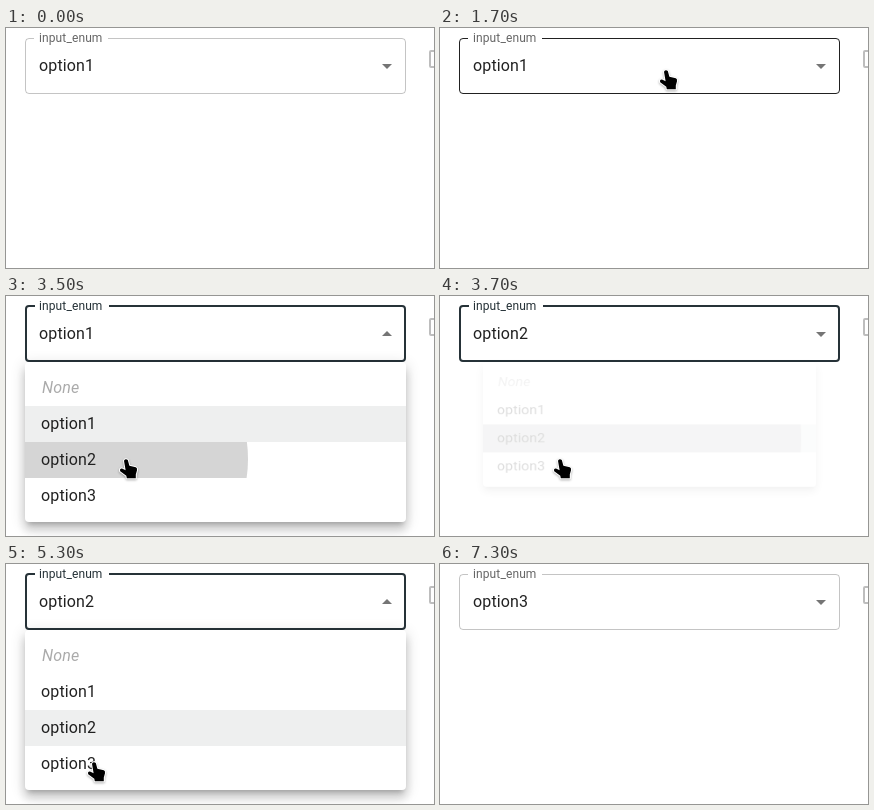
Write an HTML page that moves like this. It is 428 px wide and 240 px high and loops after 7.4 s.

```html
<!DOCTYPE html>
<html lang="en">
<head>
<meta charset="utf-8">
<title>Select field</title>
<style>
* { box-sizing: border-box; }
html, body { margin: 0; width: 100%; height: 100%; overflow: hidden; background: #fff; }
body {
  position: relative;
  font: 16px/23px Roboto, Arial, sans-serif;
  letter-spacing: .15px;
  color: rgba(0, 0, 0, .87);
}
#field { position: absolute; left: 19px; top: 9.5px; width: 381px; height: 56px; }
#value { position: absolute; left: 14px; top: 16.5px; }
#label {
  position: absolute; left: 0; top: 0; white-space: nowrap;
  color: rgba(0, 0, 0, .6);
  transform: translate(14px, -9px) scale(.75); transform-origin: 0 0;
}
fieldset {
  position: absolute; inset: -5px 0 0; margin: 0; padding: 0 8px; min-width: 0;
  border: 1px solid rgba(0, 0, 0, .23); border-radius: 4px;
}
legend { height: 11px; padding: 0; font-size: 12px; letter-spacing: .1125px; line-height: 11px; }
legend span { display: inline-block; padding: 0 5px; opacity: 0; }
.hover fieldset { border-color: rgba(0, 0, 0, .87); }
.focus fieldset { border: 2px solid #263238; }
.focus #label { color: #263238; }
#caret { position: absolute; right: 7px; top: 16.5px; fill: rgba(0, 0, 0, .54); }
.open #caret { transform: rotate(180deg); }
#check {
  position: absolute; left: 423px; top: 22px; width: 18px; height: 18px;
  border: 2px solid rgba(0, 0, 0, .26); border-radius: 2px;
}
#menu {
  position: absolute; left: 19px; top: 66px; width: 381px; height: 160px; padding: 8px 0;
  background: #fff; border-radius: 4px; transform-origin: 50% 0; will-change: transform, opacity;
  box-shadow: 0 5px 5px -3px rgba(0, 0, 0, .2), 0 8px 10px 1px rgba(0, 0, 0, .14),
    0 3px 14px 2px rgba(0, 0, 0, .12);
}
.row { position: relative; height: 36px; padding: 6px 16px; line-height: 24px; overflow: hidden; }
.none { opacity: .38; font-style: italic; text-indent: 1px; }
#ripple { position: absolute; border-radius: 50%; background: #212121; }
#cursor { position: absolute; left: 0; top: 0; overflow: visible; filter: drop-shadow(0 1px 1px rgba(0, 0, 0, .3)); }
#cursor path { stroke: #fff; stroke-width: 2; stroke-linejoin: round; paint-order: stroke; }
</style>
</head>
<body>
<div id="field">
  <div id="value">option1</div>
  <div id="label">input_enum</div>
  <fieldset><legend><span>input_enum</span></legend></fieldset>
  <svg id="caret" width="24" height="24"><path d="M7 10l5 5 5-5z"/></svg>
</div>
<div id="check"></div>
<div id="menu">
  <div class="row none">None</div>
  <div class="row">option1</div>
  <div class="row">option2</div>
  <div class="row">option3</div>
</div>
<svg id="cursor" width="1" height="1"><path/></svg>
<script>
const LOOP = 7400, TICK = 100;
const GROW = 266, RIPPLE = 550, PRESS = 227;
const BLUR = 7250, ENTER = 1100, LEAVE = 7000;

const visits = [
  { open: 2045, close: 3549, pick: 2 },
  { open: 4447, close: 6130, pick: 3 }
];

// The pointer enters at home, then glides to each stop
const home = { x: 238, y: 86 };
const moves = [
  { from: ENTER, to: 1700, x: 226, y: 42 },
  { from: 2600, to: 3000, x: 120, y: 163 },
  { from: 3700, to: 4300, x: 162, y: 36 },
  { from: 4700, to: 5300, x: 88, y: 198 },
  { from: 6500, to: LEAVE, x: 95, y: -24 }
];
const ARROW = 'M0 0V20L5.5 15.6 14 14Z';
const HAND = 'M-2 1.7Q-.5-.8 1.8 1L3.4 6.8 9.8 8.3Q11.4 9 11 11.2L9.8 15.5V19.3H.8L.3 16.8-5.8 12.2Q-6.6 9.4-4 9.6L-.4 11.2Z';

const $ = s => document.querySelector(s);
const field = $('#field'), value = $('#value'), menu = $('#menu');
const cursor = $('#cursor'), shape = $('#cursor path');
const rows = [...document.querySelectorAll('.row')];
const ripple = document.createElement('div');
ripple.id = 'ripple';

const clamp = x => Math.min(1, Math.max(0, x));
const glide = x => 1 - (1 - clamp(x)) ** 2.3;
const picked = t => visits.reduce((n, v) => t >= v.close ? v.pick : n, 1);

// cubic-bezier(.4, 0, .2, 1)
function ease(x) {
  x = clamp(x);
  let lo = 0, hi = 1;
  for (let i = 0; i < 24; i++) {
    const u = (lo + hi) / 2, v = 1 - u;
    if (1.2 * v * v * u + .6 * v * u * u + u ** 3 < x) lo = u; else hi = u;
  }
  return lo * lo * (3 - 2 * lo);
}

function pointer(t) {
  return moves.reduce((p, m) => {
    const k = glide((t - m.from) / (m.to - m.from));
    return { x: p.x + (m.x - p.x) * k, y: p.y + (m.y - p.y) * k };
  }, home);
}

function drawMenu(t, v) {
  menu.style.visibility = v ? 'visible' : 'hidden';
  if (!v) return;
  const closing = t >= v.close;
  const age = t - (closing ? v.close : v.open);
  const fade = ease(age / GROW);
  const grow = closing ? 1 - ease((age - GROW / 3) / (GROW * 2 / 3)) : ease(age / (GROW * 2 / 3));
  menu.style.opacity = closing ? 1 - fade : fade;
  menu.style.transform = `scale(${.75 + .25 * grow}, ${.5625 + .4375 * grow})`;

  const chosen = picked(t);
  rows.forEach((row, i) => {
    row.style.background = i === chosen ? `rgba(38, 50, 56, ${closing ? .12 : .08})` : 'none';
  });
  drawRipple(t, v);
}

function drawRipple(t, v) {
  const row = rows[v.pick], press = v.close - PRESS;
  if (ripple.parentNode !== row) row.append(ripple);
  const at = pointer(press), k = ease((t - press) / RIPPLE);
  const x = at.x - 19, y = at.y - 74 - 36 * v.pick;
  const reach = (far, size) => Math.max(size - far, far) + 1;
  const r = Math.hypot(reach(x, 381), reach(y, 36)) * k;
  Object.assign(ripple.style, {
    left: x - r + 'px', top: y - r + 'px', width: 2 * r + 'px', height: 2 * r + 'px',
    opacity: t < press ? 0 : (.1 + .2 * k) * (1 - ease((t - v.close) / RIPPLE))
  });
}

function draw(t) {
  const v = visits.find(a => t >= a.open && t < a.close + GROW);
  const { x, y } = pointer(t);
  const shown = t >= ENTER && t < LEAVE;
  const inField = shown && x > 19 && x < 400 && y > 10 && y < 66;
  const onRow = y >= 110 && y < 218;
  const focus = t >= visits[0].open && t < BLUR;

  field.classList.toggle('focus', focus);
  field.classList.toggle('hover', !focus && inField);
  field.classList.toggle('open', !!v && t < v.close);
  value.textContent = 'option' + picked(t);
  drawMenu(t, v);

  cursor.style.visibility = shown ? 'visible' : 'hidden';
  cursor.style.transform = `translate(${Math.round(x)}px, ${Math.round(y)}px)`;
  shape.setAttribute('d', (v ? onRow : inField) ? HAND : ARROW);
}

const start = performance.now();
function frame() {
  const t = (performance.now() - start) % LOOP;
  draw(Math.floor(t / TICK) * TICK);
  requestAnimationFrame(frame);
}
frame();
</script>
</body>
</html>
```
